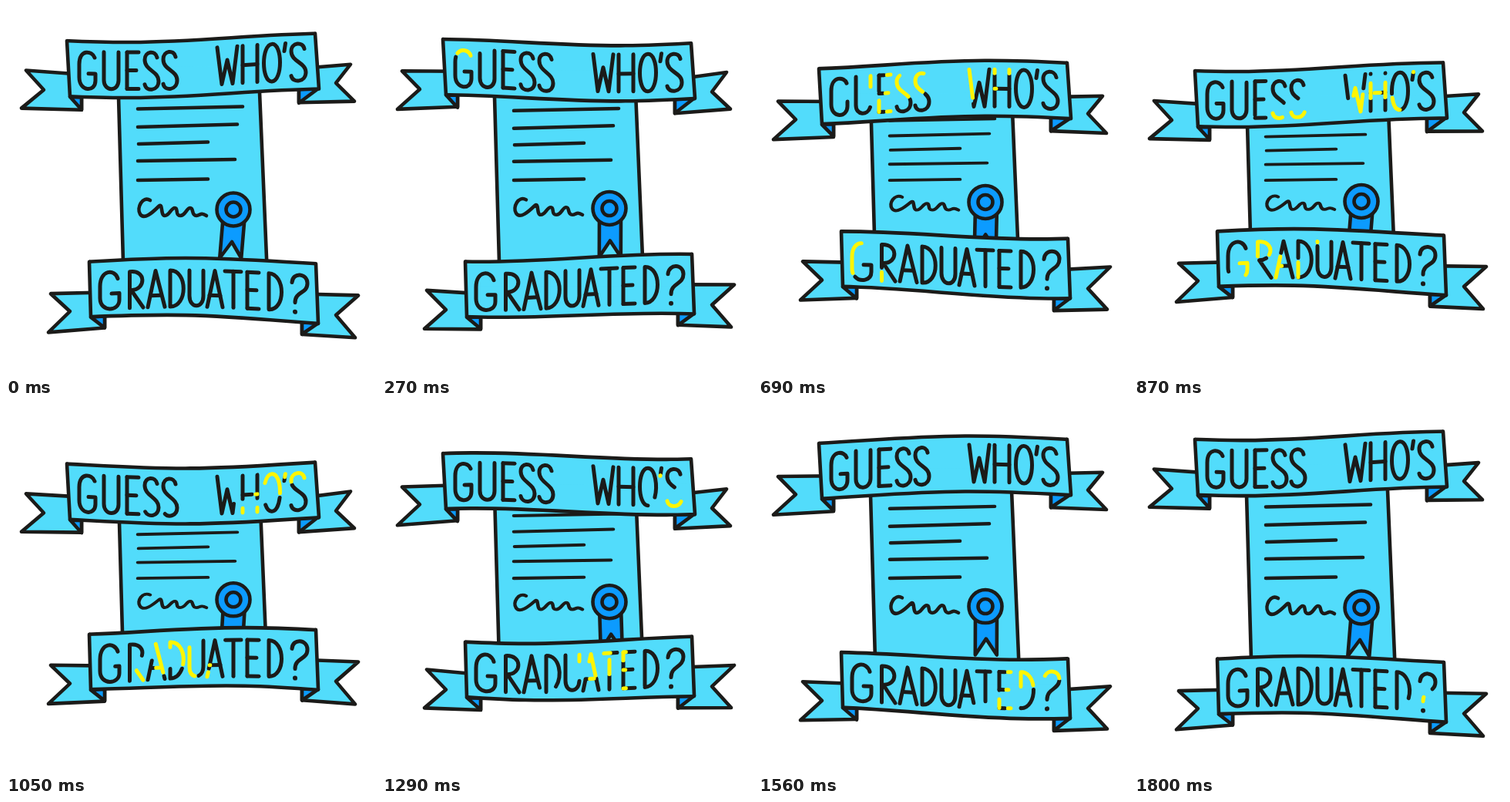
An HTML page without scripts for the animation above (1830 ms loop, 480 px wide and 480 px high).

```html
<!DOCTYPE html>
<html lang="en">
<head>
<meta charset="utf-8">
<title>Guess who's graduated?</title>
<style>
  /* --t: clock in ms, --s: how far the banners have closed in */
  @property --t { syntax: "<number>"; inherits: true; initial-value: 0; }
  @property --s { syntax: "<number>"; inherits: true; initial-value: 0; }
  @keyframes clock { from { --t: 0; } to { --t: 1830; } }
  @keyframes squeeze { 50% { --s: 1; } }

  html, body { margin: 0; height: 100%; overflow: hidden; background: #fff; }
  svg {
    display: block; width: 100vw; height: 100vh;
    fill: none; stroke: #1b1b19; stroke-width: 4.6;
    stroke-linecap: round; stroke-linejoin: round;
    animation: clock 1830ms steps(61) infinite,
               squeeze 1830ms cubic-bezier(.55, 0, .45, 1) infinite;
  }
  .sky { fill: #52dcfb; }
  .blue { fill: #0c9bff; }

  .top {
    --c: -98; --y: 41.5px; --low: 113.5px;
    transform-origin: 241px 0;
    transform: translateY(calc(38px * var(--s))) skewY(-.35deg);
  }
  .bottom {
    --c: 233; --y: 332px; --low: 401.2px;
    transform: translateY(calc(-38px * var(--s)));
  }

  /* travelling wave: the edges slide, everything else rides at its own --x */
  .edge {
    stroke-dasharray: 2082 9999;
    transform: translate(calc((var(--c) + var(--t) * 1040 / 1830) * 1px), var(--y));
  }
  .low { --y: var(--low); }
  .w {
    --a: calc(((var(--x) - var(--c)) / 520 - var(--t) / 915) * 1turn);
    transform-origin: calc(var(--x) * 1px) 0;
    transform: translateY(calc(-5px * cos(var(--a)))) skewY(calc(.06rad * sin(var(--a))));
  }

  .rows { transform-origin: 0 227px; transform: scaleY(calc(1 - .18 * var(--s))); }
  .badge { transform: translateY(calc(-10.5px * var(--s))); }
  .sway {
    transform-origin: 295px 270px;
    transform: skewX(calc(-1.2deg - 3.6deg * cos(var(--t) / 915 * 1turn)));
  }

  /* a gap runs along each stroke, with a yellow dash inside it */
  .ink { --o: 170; stroke-width: 5; stroke-dasharray: 100 70; }
  .glow { --o: 45; stroke-width: 5; stroke-dasharray: 40 300; stroke: #fff500; }
  .l { --p: clamp(0, (var(--t) - var(--b)) / 700, 1); }
  .l path {
    stroke-dashoffset: calc((var(--o) - 170 * var(--p) * var(--p) * (3 - 2 * var(--p))) * 1px);
  }
</style>
</head>
<body>
<svg viewBox="0 0 480 480" role="img" aria-label="Guess who's graduated?">
  <defs>
    <path id="upper" d="M-1560-5c95 0 165 10 260 10s165-10 260-10 165 10 260 10 165-10 260-10 165 10 260 10 165-10 260-10 165 10 260 10 165-10 260-10v42H-1560z"/>
    <path id="lower" d="M-1560-5c95 0 165 10 260 10s165-10 260-10 165 10 260 10 165-10 260-10 165 10 260 10 165-10 260-10 165 10 260 10 165-10 260-10v-42H-1560z"/>
    <clipPath id="topClip"><path d="M76.500 0H398.500L409.600 160H85.300z"/></clipPath>
    <clipPath id="bottomClip"><path d="M107.100 300H400.700L406.800 450H111.200z"/></clipPath>
  </defs>

  <path class="sky" d="M145.500 100L152.500 350H339L328.500 100z"/>
  <g class="rows">
    <path d="M171 133.500L307 130.500M171 157L300 153.500M172 179L262 176.500M171 201L297 199M171 226L262 224.500"/>
    <path d="M187 252C177 246 169 262 174 270S190 268 198 260c6-6 2 12 8 12s8-10 13-10 0 10 7 10 8-10 13-10 1 10 8 10c5 0 5-5 13 0"/>
  </g>
  <g class="badge blue">
    <path class="sway" d="M282 278V327L296 306L310 327V278z"/>
    <circle cx="295" cy="264" r="21.500"/>
    <circle cx="295" cy="264" r="9.500"/>
  </g>

  <g class="top">
    <g class="w" style="--x:45"><path class="sky" d="M98 130L20 132L49 106.500L26 82.500L98 84z"/></g>
    <g class="w" style="--x:420"><path class="sky" d="M380 131L452 130L428 106L447 82L380 87z"/></g>
    <g class="w" style="--x:90"><path class="blue" d="M83 114H98V130z"/></g>
    <g class="w" style="--x:392"><path class="blue" d="M380 113H405L380 131z"/></g>
    <g clip-path="url(#topClip)">
      <use href="#lower" class="edge low sky"/>
      <use href="#upper" class="edge sky"/>
    </g>
    <path class="w" style="--x:81" d="M79 41.500L83 113.500"/>
    <path class="w" style="--x:403" d="M401 41.500L406 113.500"/>
    <g class="ink"><g id="ask">
      <g class="w l" style="--x:105;--b:100"><path pathLength="100" d="M115 62C112 53 95 51 95 71V88C95 107 116 107 116 92V83H107"/></g>
      <g class="w l" style="--x:136;--b:205"><path pathLength="100" d="M127 54.500V91C127 106 146 106 146 91V54.500"/></g>
      <g class="w l" style="--x:164;--b:260">
        <path pathLength="100" d="M157 54.500V102"/><path pathLength="100" d="M157 54.500H172"/>
        <path pathLength="100" d="M157 78H169"/><path pathLength="100" d="M157 102H172"/>
      </g>
      <g class="w l" style="--x:189;--b:400"><path pathLength="100" d="M196 62c-2-10-16-9-16 2.500 0 14 18 15 18 28 0 13-16 14-18 4"/></g>
      <g class="w l" style="--x:213;--b:425"><path pathLength="100" d="M220 62c-2-10-16-9-16 2.500 0 14 18 15 18 28 0 13-16 14-18 4"/></g>
      <g class="w l" style="--x:287;--b:510"><path pathLength="100" d="M274 53L280 101L287 70L294 101L300 53"/></g>
      <g class="w l" style="--x:316;--b:560">
        <path pathLength="100" d="M307 53V101"/><path pathLength="100" d="M326 53V101"/>
        <path pathLength="100" d="M307 78H326"/>
      </g>
      <g class="w l" style="--x:345;--b:710"><path pathLength="100" d="M345 101.500C331 101.500 331 53 345 53S359 101.500 345 101.500"/></g>
      <g class="w l" style="--x:361;--b:780"><path pathLength="100" d="M362.500 53L361 63"/></g>
      <g class="w l" style="--x:379;--b:845"><path pathLength="100" d="M387 61c-2-10-17-9-17 2.500 0 14 19 15 19 28 0 13-17 14-19 4"/></g>
    </g></g>
    <use href="#ask" class="glow"/>
  </g>

  <g class="bottom">
    <g class="w" style="--x:85"><path class="sky" d="M128 419L55 420.500L83 395L58 370.500L128 373z"/></g>
    <g class="w" style="--x:420"><path class="sky" d="M384 424.500L453 425.500L428 397.500L457 370.500L384 372z"/></g>
    <g class="w" style="--x:118"><path class="blue" d="M110 404H128V419z"/></g>
    <g class="w" style="--x:394"><path class="blue" d="M384 409H405L384 424.500z"/></g>
    <g clip-path="url(#bottomClip)">
      <g transform="skewY(1.2)"><use href="#lower" class="edge low sky"/></g>
      <use href="#upper" class="edge sky"/>
    </g>
    <path class="w" style="--x:109" d="M108 332L110 403.500"/>
    <path class="w" style="--x:403" d="M402 332L405 409.500"/>
    <g class="ink"><g id="reply">
      <g class="w l" style="--x:134;--b:415"><path pathLength="100" d="M145 356C141 343 122 343 122 365V380C122 399 147 399 147 384V375H137"/></g>
      <g class="w l" style="--x:168;--b:565"><path pathLength="100" d="M160.500 395V348C182 346 182 372 162.500 372L178 395"/></g>
      <g class="w l" style="--x:194;--b:670">
        <path pathLength="100" d="M184 395L194 348L206 395"/><path pathLength="100" d="M188 380H201"/>
      </g>
      <g class="w l" style="--x:221;--b:710"><path pathLength="100" d="M213 395V348C236 348 236 395 213 395"/></g>
      <g class="w l" style="--x:247;--b:790"><path pathLength="100" d="M238 348V381C238 398 256 398 256 381V348"/></g>
      <g class="w l" style="--x:271;--b:940">
        <path pathLength="100" d="M261 395L271 348L281 395"/><path pathLength="100" d="M264 380H278"/>
      </g>
      <g class="w l" style="--x:295;--b:1000">
        <path pathLength="100" d="M284 348H305"/><path pathLength="100" d="M295 348V395"/>
      </g>
      <g class="w l" style="--x:320;--b:1110">
        <path pathLength="100" d="M313 348V395"/><path pathLength="100" d="M313 348H328"/>
        <path pathLength="100" d="M313 371H325"/><path pathLength="100" d="M313 395H328"/>
      </g>
      <g class="w l" style="--x:349;--b:1250"><path pathLength="100" d="M341 395V348C363 348 363 395 341 395"/></g>
      <g class="w l" style="--x:381;--b:1300"><path pathLength="100" d="M371 358C372 344 391 345 391 358C391 372 375 369 375 384"/></g>
    </g></g>
    <use href="#reply" class="glow"/>
    <g class="w" style="--x:381"><circle cx="375" cy="396" r="3" fill="#1b1b19" stroke="none"/></g>
  </g>
</svg>
</body>
</html>
```
